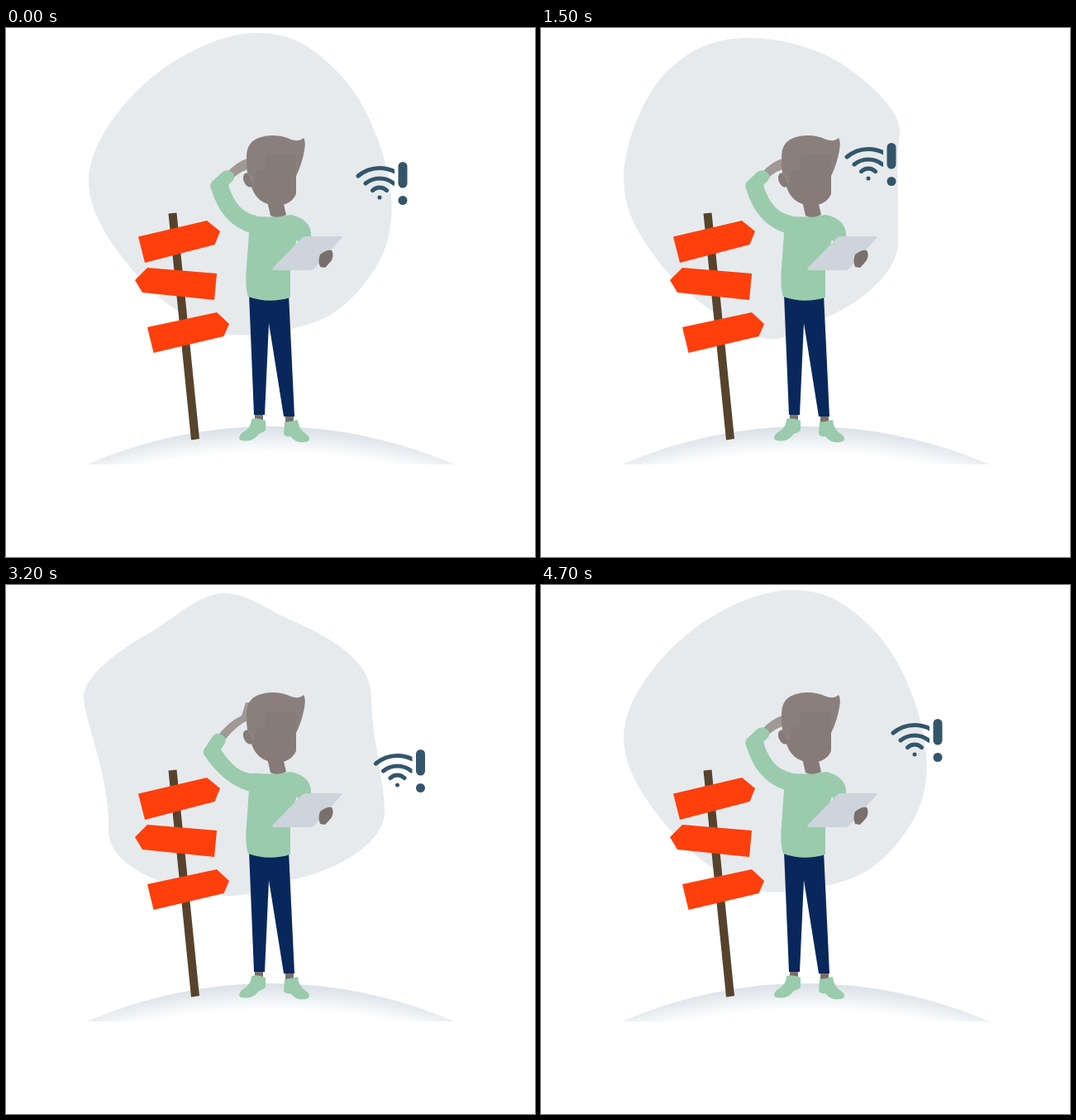
An HTML page for the animation above (4800 ms loop, 640 px wide and 640 px high).

```html
<!DOCTYPE html>
<html lang="en">
<head>
<meta charset="utf-8">
<title>Lost connection</title>
<style>
  html, body { margin: 0; width: 100%; height: 100%; overflow: hidden; background: #fff; }
  svg { display: block; width: 100%; height: 100%; }
</style>
</head>
<body>
<svg viewBox="0 0 640 640">
  <defs>
    <radialGradient id="fade" gradientUnits="userSpaceOnUse" cx="320" cy="1282" r="800">
      <stop offset=".96" stop-color="#fff"/>
      <stop offset="1" stop-color="#d9e0e6"/>
    </radialGradient>
    <clipPath id="cut"><path d="M-40-60H18V20H-40Z"/></clipPath>
  </defs>

  <path id="blob" fill="#e6eaed"/>
  <path fill="url(#fade)" d="M98 528A560 560 0 0 1 542 528Z"/>

  <g id="icon" fill="#33566b">
    <g clip-path="url(#cut)" fill="none" stroke="#33566b" stroke-width="5" stroke-linecap="round">
      <path d="M-26-26A40 40 0 0 1 26-26M-17-17A27 27 0 0 1 17-17M-8.500-8.500A12 12 0 0 1 8.500-8.500"/>
    </g>
    <circle r="2.500"/>
    <rect x="22.500" y="-43" width="11" height="31.500" rx="5.500"/>
    <circle cx="28" cy="3.500" r="5.500"/>
  </g>

  <path fill="#57432c" d="M196.500 224.500L206.500 223.500 234 497 224 498.500Z"/>
  <g fill="#ff3f0c">
    <path d="M160 252.500L243 233 259 246 252.500 262 168 284Z"/>
    <path d="M156 305L171 290 255 297 252 329 165 320Z"/>
    <path d="M171 362L255 344 270 358 263.500 373 178.500 393Z"/>
  </g>

  <path fill="#796f6a" d="M301 466H311V477H301ZM338 468H348V479H338Z"/>
  <path fill="#08285c" d="M294 322H342L349 470H336L318 357 313 468H300Z"/>
  <g fill="#9acbac">
    <path d="M297 473Q305 471 314 475V487Q310 490 306 491 300 499 292 499.500 282 500 282 496 283 490 290 487 297 481 297 473Z"/>
    <path d="M337 477Q345 476 353 474 354 484 360 489 368 494 367 498 365 502 355 501 349 500 344 494 338 495 336 491Z"/>
  </g>

  <path id="forearm" fill="#a09894"/>
  <path id="sleeve" fill="#9acbac"/>
  <path fill="#9acbac" d="M300 227.500Q322 230 345 226 367 231 369 248V256L344 290V326Q318 334 293 325 289 315 291 290L294 248Z"/>
  <path fill="#e6eaed" d="M352 256L355 260 350 262Z"/>
  <path fill="#cdd4db" d="M363 252H405Q408 252 406 254L373 291Q371 293 368 293H324Q321 293 323 290L358 254Q360 252 363 252Z"/>
  <path fill="#7a706b" d="M380 274Q388 268 394 269 397 274 394 281 390 286 386 290L380 289Q377 282 380 274Z"/>

  <path fill="#857a77" d="M315 205L320 227Q328 231 339 226L334 205Z"/>
  <path fill="#8a7f7c" d="M291 155Q291 131 322 130 335 130 345 135 355 138 360 133 363 137 361 148 358 165 351 179V200Q347 212 330 215 305 214 298 195 290 180 291 155Z"/>
  <path fill="#877b78" d="M315 153H351V200Q347 212 330 215 305 214 299 195L303 172H313Z"/>
  <ellipse fill="#857a77" cx="293" cy="184" rx="5.500" ry="9" transform="rotate(-22 293 184)"/>
  <path fill="none" stroke="#a09894" d="M293 177Q297 179 299 187"/>
</svg>
<script>
const LEG = 1600, STEP = 100;
const $ = id => document.getElementById(id);

// One pose per leg; the icon leaves it on a curve bent towards "via".
const poses = [
  { icon: [452, 205], via: [425, 181],
    blob: 'M303 6C340 6 362 18 385 38S427 80 443 118 485 230 447 290 374 356 350 363 300 373 272 371 194 338 165 306 101 230 100 187 136 94 175 61 266 6 303 6Z' },
  { icon: [396, 182], via: [457, 187],
    blob: 'M251 12C285 12 316 20 345 33S439 96 434 128 433 222 432 260 383 335 343 351 300 378 273 376 176 326 145 286 100 218 100 180 124 79 155 50 217 12 251 12Z' },
  { icon: [473.5, 242], via: [465, 216],
    blob: 'M263 10C292 10 312 28 348 44S442 88 442 135 458 236 458 275 394 347 352 355 300 378 265 376 122 352 124 295 98 170 94 140 142 76 172 59 234 10 263 10Z' }
];

// Arm lowered and raised.
const arm = {
  sleeve: [
    'M303 227Q279 223 269 190L275 184Q279 177 271 173Q265 171 261 175L249 186Q246 190 248 194Q260 236 295 248Z',
    'M300 228Q279 229 260 199L265 191Q267 183 260 181Q254 178 250 183L240 198Q237 202 240 206Q262 240 295 250Z'
  ],
  forearm: [
    'M266 176Q280 161 292 158L300 146L303 146L303 168Q285 171 272 184Z',
    'M255 184Q268 166 285 158L290 142L294 142L294 163Q280 169 265 187Z'
  ]
};

const mix = (a, b, k) => a + (b - a) * k;
const ease = u => 1 - (1 - u ** 1.4) ** 3.4;
const swing = phase => (1 - Math.cos(Math.PI * phase)) / 2;

// Blends two paths that share the same commands.
function mixPath(a, b, k) {
  const ends = b.match(/\d+/g);
  let i = 0;
  return a.replace(/\d+/g, n => mix(+n, +ends[i++], k).toFixed(2));
}

function draw(t) {
  const leg = Math.floor(t / LEG);
  const from = poses[leg], to = poses[(leg + 1) % poses.length];
  const p = ease(t % LEG / LEG);
  const place = from.icon.map((a, i) =>
    mix(mix(a, from.via[i], p), mix(from.via[i], to.icon[i], p), p));
  $('blob').setAttribute('d', mixPath(from.blob, to.blob, p));
  $('icon').setAttribute('transform', `translate(${place})`);

  // A quick scratch, then a slow one.
  const lift = swing(t < 1500 ? t / 750 : (t - 1500) / 1600);
  for (const part in arm) $(part).setAttribute('d', mixPath(...arm[part], lift));
}

const start = performance.now();
function tick() {
  const t = (performance.now() - start) % (LEG * poses.length);
  draw(Math.floor(t / STEP) * STEP);
  requestAnimationFrame(tick);
}
tick();
</script>
</body>
</html>
```
